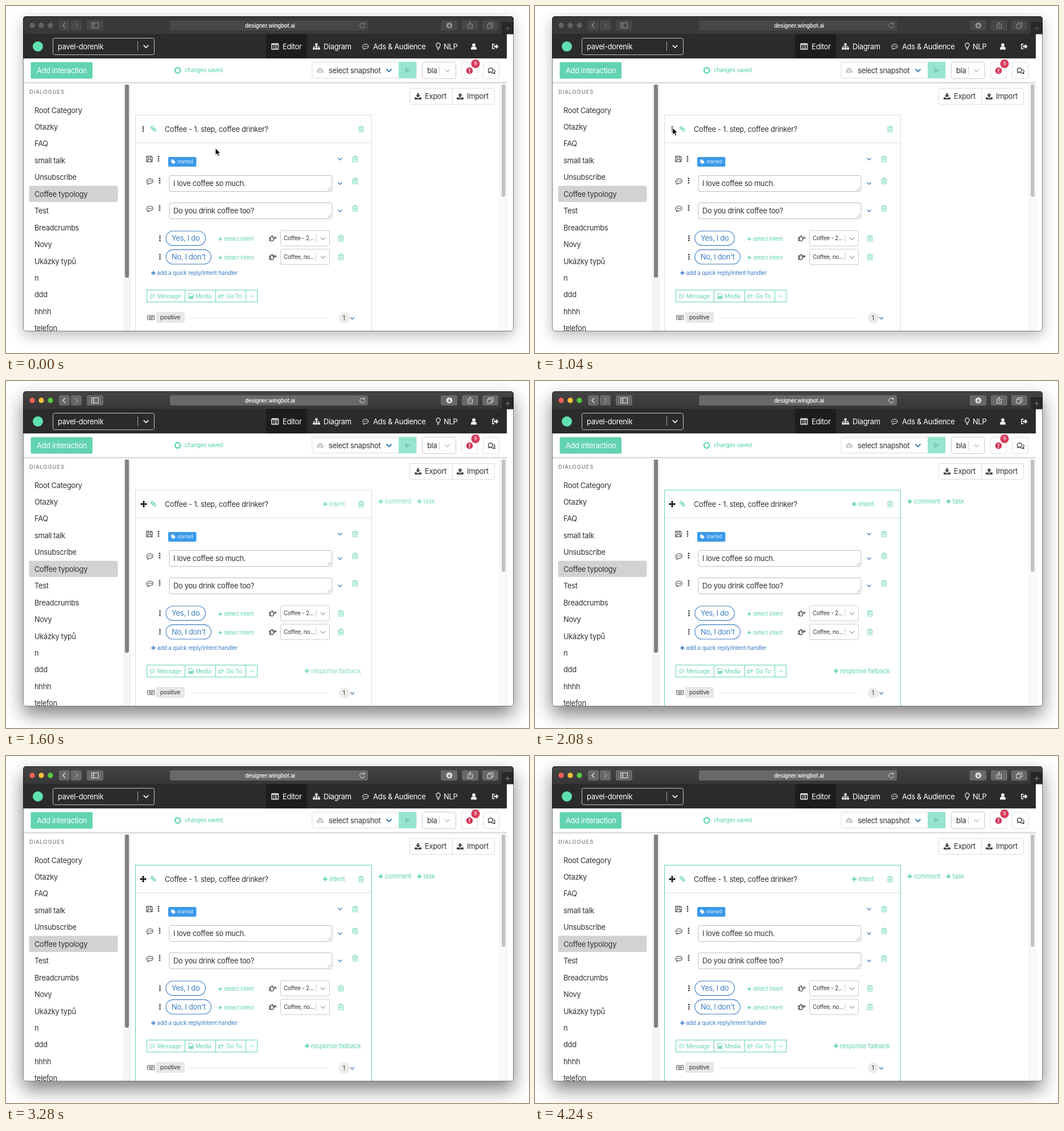
Recreate the animation shown at these times as an HTML page. Size 919 px wide and 609 px high, loop 4320 ms.

```html
<!DOCTYPE html>
<html lang="en">
<head>
<meta charset="utf-8">
<title>Dialogue editor</title>
<style>
html, body { margin: 0; width: 100%; height: 100%; overflow: hidden; background: #fff; }
#shadow { position: absolute; left: 30px; top: 18px; width: 862px; height: 553px; border-radius: 5px; }
svg { position: absolute; left: 0; top: 0; width: 919px; height: 609px; }
text { font-family: Inter, Roboto, "Liberation Sans", sans-serif; letter-spacing: -.024em; white-space: pre; }
</style>
</head>
<body>
<div id="shadow"></div>
<svg id="stage" viewBox="0 0 919 609"></svg>
<script>
const TEAL = '#62d3b1', BLUE = '#3e7fc4', INK = '#333', WHITE = '#fff';

// Shape helpers; text is placed by the middle of its capitals.
const box = (x, y, w, h, fill = 'none', stroke = 'none', r = 0, extra = '') =>
  `<rect x="${x}" y="${y}" width="${w}" height="${h}" rx="${r}" fill="${fill}" stroke="${stroke}" ${extra}/>`;
const dot = (x, y, r, fill, stroke = 'none', w = 1) =>
  `<circle cx="${x}" cy="${y}" r="${r}" fill="${fill}" stroke="${stroke}" stroke-width="${w}"/>`;
const text = (x, y, s, size = 12.9, fill = INK, extra = '') =>
  `<text x="${x}" y="${y + size * .36}" font-size="${size}" fill="${fill}" ${extra}>${s}</text>`;
const line = (d, x, y, color, w = 1, fill = 'none') =>
  `<path d="${d}" transform="translate(${x} ${y})" fill="${fill}" stroke="${color}" stroke-width="${w}"/>`;
const solid = (d, x, y, color) => line(d, x, y, 'none', 0, color);
const group = (id, body) => `<g id="${id}">${body}</g>`;
const scaled = (x, y, k, body) => `<g transform="translate(${x} ${y}) scale(${k})">${body}</g>`;

// Icons, placed by their middle.
const dots = (x, y) => [-3.8, 0, 3.8].map(d => dot(x, y + d, 1.4, '#444')).join('');
const trash = (x, y) => line('M-5-3H5M-2-3V-5H2V-3M-4-3V5H4V-3M-1.8-1V3M0-1V3M1.8-1V3', x, y, TEAL, .9);
const chevron = (x, y, color = '#3a74b4', w = 1.3, r = 3.4) =>
  line(`M${-r} ${-r / 2}L0 ${r / 2}L${r} ${-r / 2}`, x, y, color, w);
const plus = (x, y, color = TEAL, r = 4, w = 2.2) => line(`M${-r} 0H${r}M0 ${-r}V${r}`, x, y, color, w);
const chat = (x, y, color, k = 1) => scaled(x, y, k,
  line('M-3.5 3.6C-8 1.8-6.5-4.5 0-4.5S8.2 3.8 0 3.8Q-2 5.6-5 5.4-3.6 4.8-3.5 3.6Z', 0, 0, color, 1.1) +
  [-2.8, 0, 2.8].map(d => dot(d, -.3, .9, color)).join(''));
const hand = (x, y, color, k = 1) => scaled(x, y, k,
  line('M-6-2H-4L-1.6-4.7Q0-4.8-.6-2.2H5Q6.3-1.2 5-.2H1.6Q2.4 1 1.4 1.6 1.7 2.8.6 3.1.4 4.5-.8 4.5H-3.2L-4.5 3.8H-6ZM-4-2V3.8M-.5-.2H2', 0, 0, color, 1.1));
const disk = (x, y) =>
  line('M-5-5H3L5-3V5H-5ZM-2.5-5V-1.5H2V-5M-3 5V1H3V5', x, y, '#444', 1.2);
const tray = (x, y, up) => solid('M-6 1.5H-2.5L0 3.5 2.5 1.5H6V5H-6Z', x, y, '#444') +
  solid(up ? 'M0-6L4-2H1.5V1.5H-1.5V-2H-4Z' : 'M-1.5-6H1.5V-2.5H4L0 1.7-4-2.5H-1.5Z', x, y, '#444');
const link = (x, y) =>
  `<g transform="translate(${x} ${y}) rotate(45)" fill="none" stroke="${TEAL}" stroke-width="1.4">
   <rect x="-5" y="-1.8" width="5" height="3.6" rx="1.7"/><rect x="0" y="-1.8" width="5" height="3.6" rx="1.7"/></g>`;

function chrome(active) {
  const face = active ? '#686868' : '#474747', ink = active ? '#e4e4e4' : '#909090';
  const dim = active ? '#999' : '#666';
  const lights = active ? ['#f25f57', '#f6bd3b', '#58c942'] : Array(3).fill('#626263');
  const buttons = [[93, 19], [114, 19], [142, 29], [764, 29], [801, 29], [837, 28], [288, 348]];
  return box(30, 18, 862, 31, active ? 'url(#bar)' : '#393939') +
    lights.map((c, i) => dot(46 + 16 * i, 34, 4.7, c)).join('') +
    buttons.map(([x, w]) => box(x, 25, w, 18, face, 'none', 3)).join('') +
    line('M2-4.5L-2 0 2 4.5', 102, 34, ink, 1.3) + line('M-2-4.5L2 0-2 4.5', 124, 34, dim, 1.3) +
    box(150.5, 29.5, 12, 9, 'none', ink) + line('M0 0V9M-2.5 2.5H-1M-2.5 5H-1', 154.5, 29.5, ink) +
    text(420, 34.5, 'designer.wingbot.ai', 9.8, WHITE, 'font-weight="500"') +
    line('M3.5-2.5A4.3 4.3 0 1 0 4.3 1M4-5V-2H1', 626, 34, ink) +
    dot(779, 34, 5.3, ink) + line('M0-3V2M-2.3 0L0 2.5 2.3 0', 779, 34, face, 1.2) +
    line('M-2-2H-4V5H4V-2H2M0 2V-5.5M-2.3-3.5L0-5.8 2.3-3.5', 815.5, 34, ink) +
    line('M-5-2H2V5H-5ZM-2.5-2V-4.5H5V2.5H2', 851, 34, ink) +
    box(872, 29, 20, 20, '#282828', '#202020') + plus(881.5, 39.5, active ? '#888' : '#5c5c5c', 4, 1);
}

function navigation() {
  return box(30, 49, 850, 43, '#2b2b2b') + box(457, 49, 72, 43, '#1d1d1d') +
    dot(56, 71, 9, '#5fe0b0') + box(82.5, 56.5, 178, 29, 'none', '#c4c4c4', 3) +
    text(91, 71, 'pavel-dorenik', 12.9, WHITE) +
    line('M0 0V17', 231.5, 62, '#aaa') + chevron(246, 71, WHITE, 1.6, 4.3) +
    box(466.7, 66.2, 12, 10, 'none', WHITE, 1, 'stroke-width="1.2"') +
    line('M0 0H12', 466.7, 67.2, WHITE, 1.6) +
    line('M2 0H4M5 0H10M2 2.4H4M5 2.4H10M2 4.8H4M5 4.8H10', 466.7, 69.7, WHITE) +
    solid('M-2-5.5H2V-2H.6V-.5H5V2H6.2V5.5H2.8V2H4V.5H.6V2H2V5.5H-2V2H-.6V.5H-4V2H-2.8V5.5H-6.2V2H-5V-.5H-.6V-2H-2Z', 545.5, 71, WHITE) +
    chat(632, 71, WHITE, .9) +
    line('M-1.7 2.5Q-1.7 1-2.8-.2A3.5 3.5 0 1 1 2.8-.2Q1.7 1 1.7 2.5ZM-1.7 4.2H1.7M-1 5.7H1', 759.5, 70.8, WHITE, 1.1) +
    dot(822, 68.3, 2.9, WHITE) + solid('M-5 5.5Q-5 .5-2.5.5H2.5Q5 .5 5 5.5Z', 822, 71, WHITE) +
    line('M-1.5-4H-5V4H-1.5', 860, 71, WHITE, 1.5) +
    solid('M-2.5-1.5H1V-4.3L5.7 0 1 4.3V1.5H-2.5Z', 860, 71, WHITE) +
    [[486, 'Editor'], [558, 'Diagram'], [645, 'Ads &amp; Audience'], [769, 'NLP']]
      .map(([x, s]) => text(x, 71, s, 12.9, WHITE)).join('');
}

function toolbar() {
  return box(30, 134, 850, 4, 'url(#fade)') + box(30, 92, 850, 42, WHITE) +
    line('M0 0H850', 30, 134, '#cfcfcf') +
    box(43.5, 98.5, 108.5, 29, TEAL, 'none', 2) + text(54, 113, 'Add interaction', 12.9, WHITE) +
    dot(301.7, 113, 4.7, 'none', '#45cf9d', 2) + text(314, 112.8, 'changes saved', 9.8, '#50cfa8') +
    box(538, 98.5, 183, 28, WHITE, '#ddd', 2) + box(690, 98, 31, 29, '#97e5d0') +
    solid('M-4-5L5 0-4 5Z', 705.5, 113, '#7ccab1') +
    solid('M-4 4.5A3 3 0 0 1-4.5-1.2 4.2 4.2 0 0 1 3-3Q5.2-2.5 5-.3 7 .5 6.5 2.8 6 4.5 4 4.5Z', 552, 113, '#ccc') +
    line('M0 4V0M-1.8 1.5L0-.5 1.8 1.5', 552, 113, WHITE) +
    text(567, 113, 'select snapshot') + chevron(673, 113, '#477eae', 2.2, 4.5) +
    box(731.5, 98.5, 59, 29, WHITE, '#c9c9c9', 3) + text(740, 113, 'bla') +
    line('M0 0V15', 761.5, 106, '#ccc') + chevron(775.5, 113.5, '#bbb', 1.5, 4) +
    box(800.5, 98.5, 28, 29, WHITE, '#e0e0e0', 2) + dot(814.5, 113.5, 5.8, '#d33656') +
    line('M0-3.5V.8M0 1.8V3.4', 814.5, 113.5, WHITE, 1.6) +
    dot(825, 101.3, 7.6, '#d93a5a') + text(822.5, 101.3, '9', 8.5, WHITE) +
    box(838.5, 98.5, 28, 29, WHITE, '#e0e0e0', 2) +
    line('M-3.5 2.5C-7 1-6-4.5-1.5-4.5S4.5 2.6-1.5 2.6Q-3 3.8-5 3.8ZM3.5-2C7.5-.5 6.5 2.5 5 3.2L6 5.3Q3.5 5 2.8 4.2.5 4.5-1 3.3', 853, 113.3, INK, 1.2);
}

function sidebar() {
  const names = ['Root Category', 'Otazky', 'FAQ', 'small talk', 'Unsubscribe', 'Coffee typology', 'Test',
    'Breadcrumbs', 'Novy', 'Ukázky typů', 'n', 'ddd', 'hhhh', 'telefon'];
  return text(41, 151, 'DIALOGUES', 9.3, '#666', 'style="letter-spacing:1px"') +
    box(40.5, 315.5, 156, 28.5, '#d2d2d2', 'none', 3) +
    names.map((s, i) => text(50, 182.9 + 29.45 * i, s)).join('') +
    box(207, 135, 11, 436, '#f5f5f5') + line('M0 0V436M11 0V436', 207, 135, '#e8e8e8') +
    box(209, 137, 7, 340, '#808080', 'none', 3.5) +
    box(868, 135, 12, 436, '#fafafa') + line('M0 0V436M12 0V436', 868, 135, '#e9e9e9') +
    box(871, 137, 6.5, 198, '#c2c2c2', 'none', 3.2);
}

const field = (y, s) => box(287, y + .5, 286, 28, WHITE, '#bdbdbd', 3) + text(294, y + 14.2, s) +
  line('M-6 0L0-6M-3 0L0-3', 571, y + 26.5, '#888', .8) + chevron(587, y + 14.5) +
  trash(613.5, y + 10) + chat(253, y + 10.5, '#444', .95) + dots(270, y + 9.5);

const reply = (y, w, s, target) => dots(270.5, y) +
  box(281, y - 12.7, w + .5, 25.4, WHITE, BLUE, 12.7, 'stroke-width="1.1"') + text(291, y, s, 12.9, BLUE) +
  plus(376.5, y + 1.3, TEAL, 3, 1.7) + text(383, y + 1.2, 'detect intent', 9.3, TEAL) +
  hand(469, y + .3, INK) + box(482.5, y - 13.5, 86, 27, WHITE, '#c9c9c9', 3) +
  text(488, y - .2, target, 9.8) + line('M0 0V14', 545, y - 7, '#ccc') +
  chevron(557, y + .5, '#aaa', 1.4, 4) + trash(588.5, y);

function card() {
  return box(709.5, 144.5, 149, 28, WHITE, '#dcdcdc', 2) + line('M0 0V28', 784.5, 144.5, '#dcdcdc') +
    tray(724, 159) + text(736, 158.8, 'Export') + tray(798, 159, true) + text(810, 158.8, 'Import') +
    box(227.5, 191.5, 415, 400, WHITE, '#dcdcdc', 0, 'id="frame"') +
    line('M0 0H414', 228, 240, '#dcdcdc') + group('handle', dots(241, 216)) + link(259, 215.5) +
    text(279, 216, 'Coffee - 1. step, coffee drinker?') + trash(624, 216) +
    disk(252, 268.5) + dots(268, 268.3) + box(285, 265, 49.5, 17, '#3b9ae9', 'none', 2.5) +
    solid('M-4-4H0L4 .3.3 4-4 0Z', 294, 273.6, WHITE) + dot(291.7, 271.3, .8, '#3b9ae9') +
    text(301, 273.3, 'started', 8.3, '#e4f1fc', 'style="letter-spacing:0"') +
    chevron(587, 268.5) + trash(613.5, 268.5) +
    field(297, 'I love coffee so much.') + field(345, 'Do you drink coffee too?') +
    reply(407.7, 69, 'Yes, I do', 'Coffee - 2...') + reply(440.3, 79, "No, I don't", 'Coffee, no...') +
    plus(259, 468.5, BLUE, 3.7, 1.9) + text(265.5, 468.3, 'add a quick reply/intent handler', 10, BLUE) +
    box(247.5, 498.5, 194, 21, WHITE, TEAL) + line('M67 0V21M121 0V21M174 0V21', 247.5, 498.5, TEAL) +
    chat(257.5, 509, TEAL, .75) + text(266, 509, 'Message', 10, TEAL) +
    line('M-4-4.5H2L4-2.5V4.5H-4Z', 325, 509, TEAL) + solid('M-3 3.5V1.5L-1 0 .5 1 2-1 3 .5V3.5Z', 325, 509, TEAL) +
    text(333, 509, 'Media', 10, TEAL) + hand(378.5, 509.3, TEAL, .8) + text(387.5, 509, 'Go To', 10, TEAL) +
    line('M-3 1.5L0-1.5 3 1.5', 432, 509.5, TEAL) +
    box(248.5, 543, 12.5, 7.5, 'none', '#555', 1) + line('M2 2.3H11M2 4H11M3.5 5.8H9', 248.3, 543, '#555', .9) +
    box(264, 537, 50, 19, '#e7e7e7', 'none', 3) + text(271, 546.3, 'positive', 10.1) +
    line('M0 0H244', 322, 547.5, '#e2e2e2') + dot(594.5, 547.5, 9.6, '#ebebeb') + text(591.7, 547.7, '1', 10) +
    chevron(608.5, 548);
}

const extras = [[561, 216, 'intent'], [658.5, 211.3, 'comment'], [726.5, 211.3, 'task'], [529, 508.8, 'response fallback']]
  .map(([x, y, s]) => plus(x, y) + text(x + 7, y, s, 11, TEAL)).join('');

stage.innerHTML = `<defs>
  <clipPath id="clip">${box(30, 18, 862, 553, WHITE, 'none', 5)}</clipPath>
  <linearGradient id="bar" x2="0" y2="1"><stop stop-color="#454545"/><stop offset="1" stop-color="#363636"/></linearGradient>
  <linearGradient id="fade" x2="0" y2="1"><stop stop-color="#ddd"/><stop offset="1" stop-color="#fff"/></linearGradient>
  </defs><g clip-path="url(#clip)">` +
  box(30, 18, 862, 553, WHITE) + card() + group('extras', extras) + sidebar() + toolbar() +
  group('resting', chrome(false)) + group('focused', chrome(true)) + navigation() + '</g>' +
  box(30.5, 18.5, 861, 552, 'none', 'rgba(0,0,0,.5)', 4.5) +
  group('arrow', line('M0 0V12.2L2.8 9.6 4.8 14.2 6.9 13.3 5 8.9H8.8Z', 0, 0, WHITE, .9, '#000')) +
  group('mover', solid('M0-6L2.6-3H.9V-.9H3V-2.6L6 0 3 2.6V.9H.9V3H2.6L0 6-2.6 3H-.9V.9H-3V2.6L-6 0-3-2.6V-.9H-.9V-3H-2.6Z', 0, 0, '#000'));

const $ = id => document.getElementById(id);
const show = (id, on) => $(id).setAttribute('display', on ? 'inline' : 'none');
const ramp = (t, a, b) => Math.min(1, Math.max(0, (t - a) / (b - a)));
const mix = (a, b, k) => a + (b - a) * k;

function draw(now) {
  const t = now % 4320, active = t >= 1120, hover = t >= 1280;
  const k = ramp(t, 120, 880), ease = k * k * (3 - 2 * k);
  $('shadow').style.boxShadow = active
    ? '0 14px 32px rgba(0,0,0,.5)'
    : '0 7px 24px rgba(0,0,0,.28)';
  show('focused', active);
  show('resting', !active);
  show('arrow', !hover);
  show('mover', hover);
  show('handle', !hover);
  $('arrow').setAttribute('transform', `translate(${mix(368, 241.7, ease)} ${mix(249.5, 213.7, ease)})`);
  $('mover').setAttribute('transform', `translate(${t < 1760 ? 242 : 241} 216)`);
  $('extras').setAttribute('opacity', ramp(t, 1280, 1680));
  $('frame').setAttribute('stroke', t < 1840 ? '#dcdcdc' : TEAL);
}
requestAnimationFrame(function tick() {
  draw(performance.now());
  requestAnimationFrame(tick);
});
</script>
</body>
</html>
```
